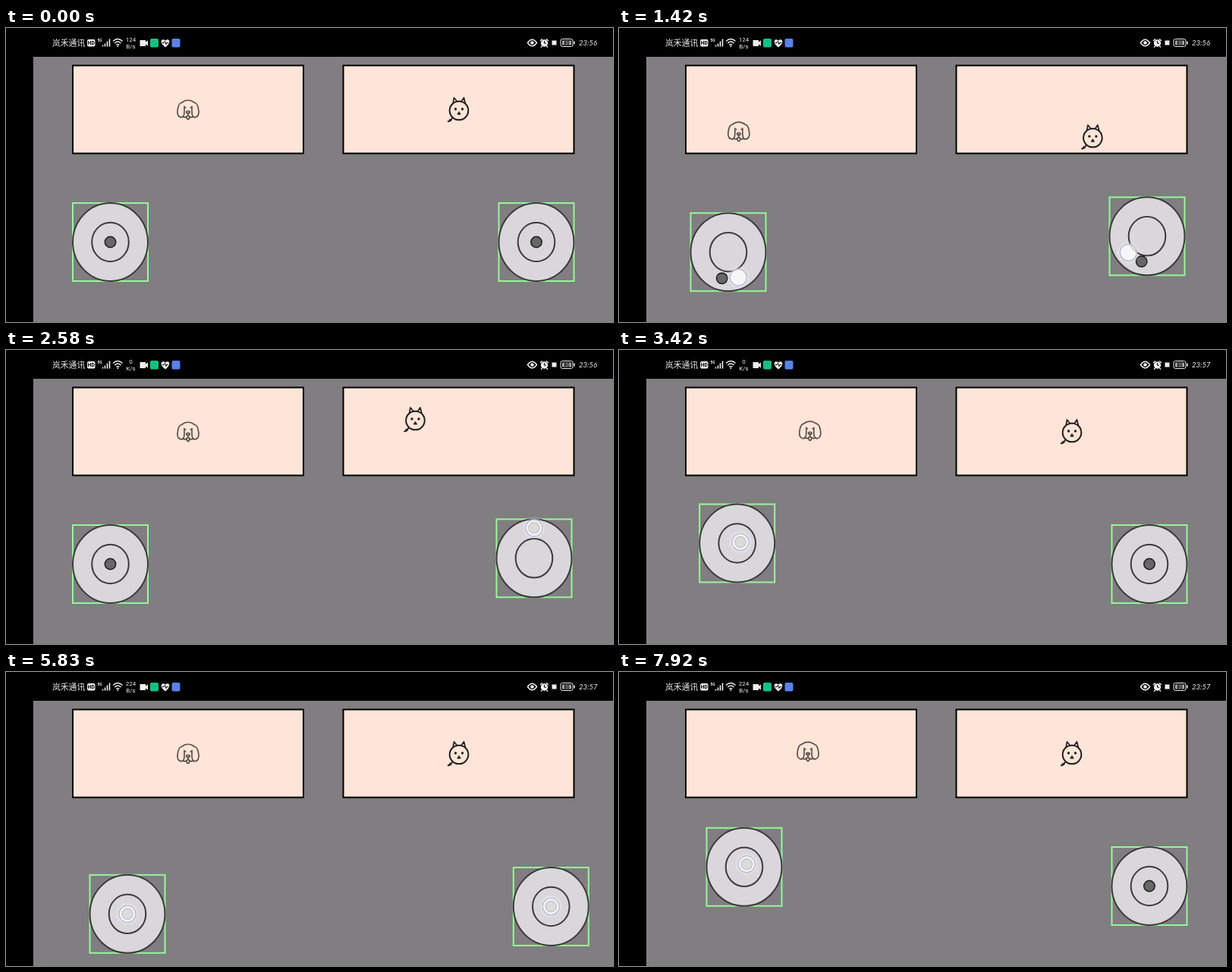
Recreate the animation shown at these times as an HTML page. Size 800 by 388 pixels, loop 8000 ms.

```html
<!DOCTYPE html>
<html lang="zh">
<head>
<meta charset="utf-8">
<title>Two joysticks</title>
<style>
  html, body { margin: 0; width: 100%; height: 100%; overflow: hidden; background: #000; }
  svg { display: block; width: 800px; height: 388px; }
  text { font-family: Roboto, sans-serif; fill: #eee; }
  .mid { text-anchor: middle; }
  .line { fill: none; stroke: #eee; }
  .panel { fill: #fee5d7; stroke: #000; stroke-width: 2; }
  .disc { fill: #d9d7da; stroke: #3b3a3c; stroke-width: 2; }
  .dog { fill: none; stroke: #594f4c; stroke-width: 1.7; stroke-linecap: round; }
  .cat { fill: none; stroke: #231f20; stroke-width: 2; stroke-linejoin: round; }
</style>
</head>
<body>
<svg viewBox="0 0 800 388">
  <defs>
    <radialGradient id="glow">
      <stop offset=".65" stop-color="#fff" stop-opacity=".45"/>
      <stop offset="1" stop-color="#fff" stop-opacity="0"/>
    </radialGradient>
    <g id="base">
      <rect x="-49.5" y="-51.5" width="99" height="103" fill="none" stroke="#98f598" stroke-width="2"/>
      <ellipse class="disc" rx="49.5" ry="51.5"/>
      <ellipse class="disc" rx="24.3" ry="25.7"/>
    </g>
    <circle id="knob" r="7.2" fill="#000" fill-opacity=".52" stroke="#1c1c1c" stroke-width="1.5"/>
    <g id="touch">
      <circle r="15.5" fill="url(#glow)"/>
      <circle r="11" fill="#fff" fill-opacity=".57" stroke="#b4b6d8" stroke-width="1.2"/>
    </g>
    <clipPath id="clip"><path d="M87 49H393V167H87ZM443 49H749V167H443Z"/></clipPath>
  </defs>

  <rect width="800" height="388"/>
  <rect x="36" y="38" width="764" height="350" fill="#807e80"/>

  <!-- status bar -->
  <text x="61" y="23.5" font-size="10.8" style="font-family:'Noto Sans CJK SC','Noto Sans CJK',sans-serif">岚禾通讯</text>
  <rect x="107" y="15" width="10.5" height="9.5" rx="2" fill="#eee"/>
  <text class="mid" x="112.2" y="22.3" font-size="6.5" font-weight="700" style="fill:#000">HD</text>
  <text x="120.5" y="18" font-size="5" font-weight="700">5G</text>
  <path class="line" stroke-width="1.6" d="M127.5 24.5v-2M130.5 24.5v-4M133.5 24.5v-7M136.5 24.5v-10"/>
  <path class="line" stroke-width="1.4" d="M141 17.5Q147.300 11.500 153.500 17.500M143.200 20Q147.300 16 151.500 20M145.300 22.300Q147.300 20.500 149.300 22.300"/>
  <circle cx="147.300" cy="24" r="1" fill="#eee"/>
  <text id="rate" class="mid" x="164.500" y="18" font-size="8"></text>
  <text id="unit" class="mid" x="164.500" y="27" font-size="8"></text>
  <path fill="#eee" d="M176.500 16h7.500v2.500l3-2v7l-3-2v2.500h-7.500z"/>
  <rect x="190" y="14" width="11" height="11.500" rx="2" fill="#12c184"/>
  <path fill="#eee" d="M210 25.500C201 19 205 12.500 210 16.500C215 12.500 219 19 210 25.500Z"/>
  <path fill="none" stroke="#000" d="M206 19.500h2l1.500-2 1.500 4 1-2h2"/>
  <rect x="218.500" y="14" width="11" height="11.500" rx="2" fill="#5a82e8"/>
  <path class="line" stroke-width="1.500" d="M687.500 19.500Q693.500 11 699.500 19.500Q693.500 28 687.500 19.500Z"/>
  <circle cx="693.500" cy="19.500" r="2.300" fill="#eee"/>
  <circle cx="709.500" cy="20" r="4.700" fill="#eee"/>
  <path class="line" stroke-width="1.600" d="M704 17l3-2.500M715 17l-3-2.500M706.500 24l-1.500 1.500M712.500 24l1.500 1.500"/>
  <path stroke="#000" fill="none" d="M709.500 17v3.200h2.500"/>
  <rect x="719.500" y="16.500" width="6" height="6" fill="#eee"/>
  <rect class="line" x="731" y="14.500" width="16" height="10" rx="2.500"/>
  <rect x="733" y="16.500" width="12" height="6" rx="1" fill="#aaa"/>
  <path stroke="#eee" stroke-width="1.500" d="M749 17.500v4"/>
  <text class="mid" x="739" y="22.200" font-size="6.500" font-weight="700" style="fill:#000">80</text>
  <text id="clock" x="755" y="23" font-size="9.500" font-style="italic" style="font-family:Lato,sans-serif"></text>

  <rect class="panel" x="88" y="49.500" width="304" height="116"/>
  <rect class="panel" x="444.500" y="49.500" width="304" height="116"/>
  <g clip-path="url(#clip)">
    <g id="pet0" class="dog">
      <path d="M-8.500-9.500Q0-16 8.500-9.500M-5-4.500V3Q-5 9.500-9 10Q-14.500 9-14 2Q-13-9-8.500-9.500M5-4.500V3Q5 9.500 9 10Q14.500 9 14 2Q13-9 8.500-9.500"/>
      <path d="M-7 9Q-3 11.500 0 7Q3 11.500 7 9M0 4V7M-2 9.500Q-1.500 12.500 0 12.500Q1.500 12.500 2 9.500"/>
      <ellipse cy="3" rx="2.200" ry="1.500"/>
      <path stroke-width="1.900" d="M-3.500-3h.1M3.500-3h.1"/>
    </g>
    <g id="pet1" class="cat">
      <circle cx="1" cy="1" r="12.300"/>
      <path d="M-7-8L-5.500-16L-1.500-11M4-11L7.500-16L9.500-8" stroke-width="1.700"/>
      <path d="M-8 10.500Q-10 16-14 15M-12 12.500L-9 14.500" stroke-width="2"/>
      <path d="M1 2.500L3.200 6H-1.200Z" fill="#231f20" stroke-width="1"/>
      <circle cx="-3.500" cy="-1" r="1.700" fill="#231f20" stroke="none"/>
      <circle cx="5.500" cy="-1" r="1.700" fill="#231f20" stroke="none"/>
    </g>
  </g>
  <use id="base0" href="#base"/><use id="knob0" href="#knob"/>
  <use id="base1" href="#base"/><use id="knob1" href="#knob"/>
  <use id="touch0" href="#touch"/><use id="touch1" href="#touch"/>
</svg>
<script>
const LOOP = 8000, FPS = 12;
const REACH_X = 50, REACH_Y = 52.5;   // knob limits
const GAIN_X = 2.74, GAIN_Y = 0.8;    // knob offset to pet offset

// Drags: first and last tick, where the pad lands, finger path as [tick, dx, dy].
const sticks = [
  { home: [137.5, 282.5], pet: [240, 108], drags: [
    { from: 6, to: 31, at: [144, 295.7], path: [[6, 0, 0], [7, 3, -54], [8, 3, -60], [9, -4, -72],
      [12, -62, -20], [15, -30, 36], [18, 35, 32], [20, 45, -30], [21, 5, -62], [22, -52, -56],
      [23, -56, -34], [24, -32, -2], [26, 5, 36], [28, 45, 0], [30, 10, -40]] },
    { from: 35, to: 57, at: [155.7, 255], path: [[35, 0, 0], [38, 4.3, -1.5]] },
    { from: 61, to: 85, at: [160, 319.3], path: [[76, 0, 0], [78, -2, -50], [80, -60, -50], [82, -72, 0]] },
    { from: 92, to: 99, at: [165, 257.3], path: [[92, 0, 0], [93, 3.3, -3.7]] },
  ] },
  { home: [699, 282.5], pet: [596, 108], drags: [
    { from: 6, to: 32, at: [696, 274.8], path: [[6, 0, 0], [7, 2, -43], [8, 1.5, -31], [9, 3, -42],
      [12, 48, -5], [15, 10, 45], [18, -42, 10], [20, -15, -45], [21, 25, -45], [22, 44, -20],
      [23, 29.5, 8], [24, 22, 29], [26, -10, 35], [28, -42, 0], [30, 0, -40]] },
    { from: 42, to: 54, at: [668.8, 243], path: [[44, 0, 0], [46, -10, -58], [48, 50, -40],
      [50, 54, 56], [52, 52, 64]] },
    { from: 70, to: 84, at: [718.3, 309.5], path: [[76, 0, 0], [78, 5, -45], [80, 38, -10],
      [82, 5, 40], [84, -40, 5]] },
  ] },
];

const el = id => document.getElementById(id);
const move = (id, [x, y], [dx, dy] = [0, 0]) =>
  el(id).setAttribute('transform', `translate(${x + dx} ${y + dy})`);
const clamp = (v, m) => Math.max(-m, Math.min(m, v));

function finger(path, n) {
  const i = path.findIndex(k => k[0] > n);
  if (i < 0) return path[path.length - 1].slice(1);
  if (i === 0) return path[0].slice(1);
  const [a, b] = [path[i - 1], path[i]], u = (n - a[0]) / (b[0] - a[0]);
  return [1, 2].map(j => a[j] + (b[j] - a[j]) * u);
}

function limited(path, n) {
  const [x, y] = finger(path, n);
  return [clamp(x, REACH_X), clamp(y, REACH_Y)];
}

function draw(n) {
  sticks.forEach(({ home, pet, drags }, i) => {
    const drag = drags.find(d => n >= d.from && n < d.to);
    const at = drag ? drag.at : home;
    const path = drag ? drag.path : [[0, 0, 0]];
    // The knob trails the finger by one tick, the pet by two.
    const [px, py] = limited(path, n - 2);
    move('base' + i, at);
    move('knob' + i, at, limited(path, n - 1));
    move('pet' + i, pet, [px * GAIN_X, py * GAIN_Y]);
    move('touch' + i, at, finger(path, n));
    el('touch' + i).style.display = drag ? '' : 'none';
  });
  el('rate').textContent = n < 26 ? '124' : n < 62 ? '0' : '224';
  el('unit').textContent = n >= 26 && n < 62 ? 'K/s' : 'B/s';
  el('clock').textContent = n < 38 ? '23:56' : '23:57';
}

function frame() {
  const t = performance.now() % LOOP;
  draw(Math.floor(t * FPS / 1000 + 0.06));
  requestAnimationFrame(frame);
}
frame();
</script>
</body>
</html>
```
